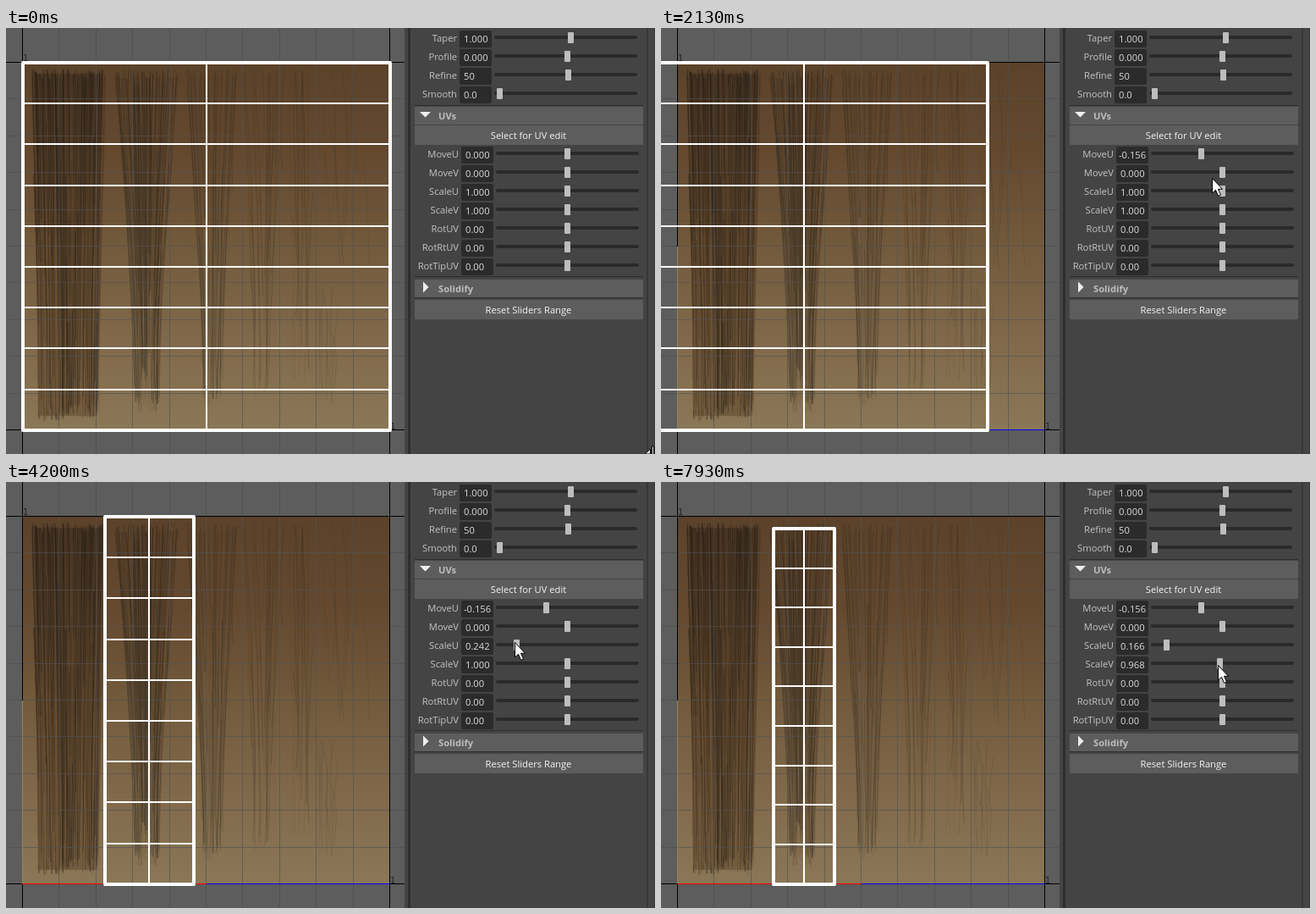
Write an HTML page with a canvas that moves like this. It is 767 px wide and 503 px high and loops after 8 s.

```html
<!DOCTYPE html>
<html lang="en">
<head>
<meta charset="utf-8">
<title>UV slider demo</title>
<style>
  html, body { margin: 0; width: 100%; height: 100%; overflow: hidden; background: #444; }
  canvas, svg { position: absolute; left: 0; top: 0; display: block; }
  text { font: 11.2px "Open Sans", "Noto Sans", sans-serif; fill: #c4c4c4; }
  .label { text-anchor: end; }
  .value { fill: #dcdcdc; }
  .button { text-anchor: middle; fill: #f4f4f4; }
  .head { font-weight: 700; fill: #bdbdbd; }
  .tick { font: 10px "DejaVu Sans", sans-serif; fill: #222; }
</style>
</head>
<body>
<canvas id="view" width="471" height="503"></canvas>
<svg id="ui" width="767" height="503" viewBox="0 0 767 503"></svg>
<script>
const LOOP = 8000, STEP = 1000 / 15;
const SIZE = 433.75, BOTTOM = 474.75, MID = 237;

// ---------- viewport ----------
const g = document.getElementById('view').getContext('2d');
let seed = 7;
const rnd = () => (seed = (seed * 16807) % 2147483647) / 2147483647;
const fill = (c, x, y, w, h) => { g.fillStyle = c; g.fillRect(x, y, w, h); };

function gradient(y0, y1, ...colors) {
  const gr = g.createLinearGradient(0, y0, 0, y1);
  colors.forEach((c, i) => gr.addColorStop(i / (colors.length - 1), c));
  return gr;
}

// One wavy hair between two heights of a tapering lock.
function strand(x, wide, tip, y0, y1, wave) {
  const u = rnd() * 2 - 1;
  const from = rnd() < .45 ? rnd() * .03 : rnd() * .6;
  const to = Math.min(1 - rnd() * .05, from + .3 + rnd() * .7);
  const point = k => {
    const p = from + (to - from) * k;
    const w = wide + (tip - wide) * Math.min(1, p * 1.4);
    return [x + u * w / 2 + (rnd() - .5) * 2 * wave, y0 + (y1 - y0) * p];
  };
  g.lineWidth = .6 + rnd() * .7;
  g.beginPath();
  g.moveTo(...point(0));
  g.bezierCurveTo(...point(.33), ...point(.66), ...point(1));
  g.stroke();
}

function drawHair() {
  const dark = gradient(50, 460, '#251c14', '#33281b', '#3b2f20');
  const brown = gradient(50, 460, '#4a3522', '#664a2e', '#775b3b');
  const grey = gradient(50, 450, '#3a2d20', '#453a2a', '#4e4636');

  g.globalAlpha = .5;
  g.fillStyle = gradient(48, 464, '#33261a', '#4d3723', '#5c442b');
  g.beginPath();
  g.moveTo(34, 54); g.lineTo(114, 54); g.lineTo(108, 458); g.lineTo(38, 458);
  g.fill();

  // Locks get narrower, sparser and fainter to the right.
  for (let i = 0; i < 6; i++) {
    const x = 74 + 101 * i - 8 * i * i, count = 16 + 380 * .4 ** i;
    const top = i === 5 ? 304 : 48, tones = i ? [dark, grey, brown] : [dark, brown];
    for (let n = 0; n < count; n++) {
      g.globalAlpha = (.35 + rnd() * .5) / (1 + .45 * i);
      g.strokeStyle = tones[n % tones.length];
      strand(x, 88 - 13 * i, i ? 32 - 3 * i : 72, top, 464 - 9 * i + (i === 5 ? 26 : 0), i ? 2 + .5 * i : 1.2);
    }
  }
  g.strokeStyle = grey;
  g.globalAlpha = .22;
  for (let n = 0; n < 12; n++) strand(405, 66, 60, 46, 290, 6);
  g.globalAlpha = 1;
}

function drawView() {
  const lines = Array.from({ length: 9 }, (_, i) => Math.round(43.4 * (i + 1)));
  const grid = color => lines.forEach(d => {
    fill(color, 19 + d, 0, 1, 503);
    fill(color, 0, 40 + d, 471, 1);
  });
  fill('#5d5d5d', 0, 0, 471, 503);
  grid('#525252');
  fill(gradient(41, 474, '#5b422a', '#64492f', '#725a3c', '#80694a', '#8a7756'), 19, 41, 435, 433);
  drawHair();
  grid('rgba(82,82,84,.65)');
  [40, 474].forEach(y => fill('#000', 0, y, 471, 1));
  [19, 453].forEach(x => fill('#000', x, 0, 1, 503));
  fill('#8f8658', 19, 258, 1, 216);
  fill('#f00', 19, 474, 218, 1);
  fill('#00f', MID, 474, 217, 1);
}

// ---------- panel ----------
const rect = (x, y, w, h, c, more = '') => `<rect x="${x}" y="${y}" width="${w}" height="${h}" fill="${c}" ${more}/>`;
const text = (x, y, s, cls, more = '') => `<text x="${x}" y="${y}" class="${cls}" ${more}>${s}</text>`;
const bar = (y, h) => rect(483, y, 270, h, '#5d5d5d', 'rx="1"');
const rule = y => rect(483, y, 270, 1, '#2e2e2e');

function slider(name, value, y, knob, x) {
  return text(x - 3, y + 4, name, 'label') +
    rect(x, y - 9, 38, 20, '#2b2b2b', 'rx="2"') +
    text(x + 5, y + 5, value, 'value', `id="${name}Value"`) +
    rect(x + 41, y - 3, 169, 4, '#2a2a2a', 'rx="2"') +
    rect(knob - 3, y - 7, 7, 13, '#bdbdbd', `rx="1" id="${name}Knob"`);
}

const upper = [['Taper', '1.000', 667], ['Profile', '0.000', 663], ['Refine', '50', 664], ['Smooth', '0.0', 583]];
const lower = [['MoveU', '0.000'], ['MoveV', '0.000'], ['ScaleU', '1.000'], ['ScaleV', '1.000'],
  ['RotUV', '0.00'], ['RotRtUV', '0.00'], ['RotTipUV', '0.00']];

document.getElementById('ui').innerHTML =
  text(20, 39, '1', 'tick') + text(454, 474, '1', 'tick') +
  '<path id="mesh" fill="none" stroke="#fff" stroke-width="2"/>' +
  '<path id="frame" fill="none" stroke="#fff" stroke-width="4" stroke-linejoin="round"/>' +
  rect(471, 0, 296, 503, '#444') + rect(475, 0, 3, 503, '#2e2e2e') +
  rect(757, 0, 2, 503, '#373737') + rect(766, 0, 1, 503, '#373737') +
  upper.map(([n, v, k], i) => slider(n, v, 12 + 22 * i, k, 536)).join('') +
  rule(91) + bar(93, 21) +
  '<path d="M489 99h13l-6.500 6.500z" fill="#eee"/>' + text(511, 108, 'UVs', 'head') +
  bar(115, 23) + text(617.5, 131, 'Select for UV edit', 'button') +
  lower.map(([n, v], i) => slider(n, v, 149 + 22 * i, 663, 538)).join('') +
  rule(293) + bar(297, 21) +
  '<path d="M493 299.500v13l6.500-6.500z" fill="#eee"/>' + text(511, 312, 'Solidify', 'head') +
  rule(318) + bar(321, 23) + text(617.5, 337, 'Reset Sliders Range', 'button') +
  '<g id="resize" stroke="#000" fill="#fff"><path d="M755.500 503l6-6v6z"/><path d="M763.500 504v-10h2v10z"/></g>' +
  '<path id="arrow" d="M.5.5V18l4-3.700 3 7 3-1.300-3-6.700h5z" fill="#fff" stroke="#000"/>';

// ---------- motion: [time, value...] stops, eased in between ----------
const moveU = [[895, 0], [1530, -.156]];
const scaleU = [[3108, 1], [4200, .242], [4330, .242], [4730, .166]];
const scaleV = [[6740, 1], [6800, 1.007], [6870, 1.007], [6930, .981], [7130, .981], [7400, .963], [7670, .963], [7930, .968]];
const path = [[0, 760, 490], [800, 662, 147], [1530, 636, 149], [1800, 636, 149], [2470, 667, 207], [2870, 662, 193],
  [3270, 656, 191], [4200, 600, 189], [4930, 595, 189], [5530, 669, 234], [5800, 658, 214], [6070, 658, 214],
  [6470, 663, 214], [7930, 658, 216]];

const ease = p => p * p * (3 - 2 * p);

function sample(keys, t, c = 1) {
  const i = keys.findIndex(k => k[0] > t);
  if (i === 0) return keys[0][c];
  if (i < 0) return keys[keys.length - 1][c];
  const a = keys[i - 1], b = keys[i];
  return a[c] + (b[c] - a[c]) * ease((t - a[0]) / (b[0] - a[0]));
}

const $ = id => document.getElementById(id);

function setSlider(name, value, offset) {
  const s = value.toFixed(3), x = Math.round(663 + offset), label = $(name + 'Value');
  label.textContent = s;
  label.setAttribute('x', s[0] === '-' ? 541 : 543);
  $(name + 'Knob').setAttribute('x', x - 3);
  return x;
}

function draw(t) {
  const u = sample(moveU, t), su = sample(scaleU, t), sv = sample(scaleV, t);
  const drags = [
    [900, 1800, setSlider('MoveU', u, u * 160)],
    [3100, 4940, setSlider('ScaleU', su, (su - 1) * 79)],
    [6780, LOOP, setSlider('ScaleV', sv, (sv - 1) * 79)]
  ];

  const cx = MID + u * SIZE, half = SIZE / 2 * su, h = SIZE * sv;
  const l = Math.round(cx - half), r = Math.round(cx + half), m = Math.round(cx);
  const row = i => Math.round(BOTTOM - h * (1 - i / 9));
  let mesh = `M${m} ${row(0)}V${row(9)}`;
  for (let i = 1; i < 9; i++) mesh += `M${l} ${row(i)}H${r}`;
  $('mesh').setAttribute('d', mesh);
  $('frame').setAttribute('d', `M${l} ${row(0)}H${r}V${row(9)}H${l}Z`);

  const drag = drags.find(([from, to]) => t >= from && t < to);
  const x = drag ? drag[2] - 2 : Math.round(sample(path, t, 1));
  const y = Math.round(sample(path, t, 2));
  $('arrow').setAttribute('transform', `translate(${x} ${y})`);
  $('arrow').style.display = t < 60 ? 'none' : '';
  $('resize').style.display = t < 60 ? '' : 'none';
}

drawView();
const start = performance.now();
function tick() {
  const t = (performance.now() - start) % LOOP;
  // The picture advances 15 times a second, on times rounded to 10 ms.
  draw(Math.round(Math.floor((t + 4) / STEP) * STEP / 10) * 10 % LOOP);
  requestAnimationFrame(tick);
}
tick();
</script>
</body>
</html>
```
